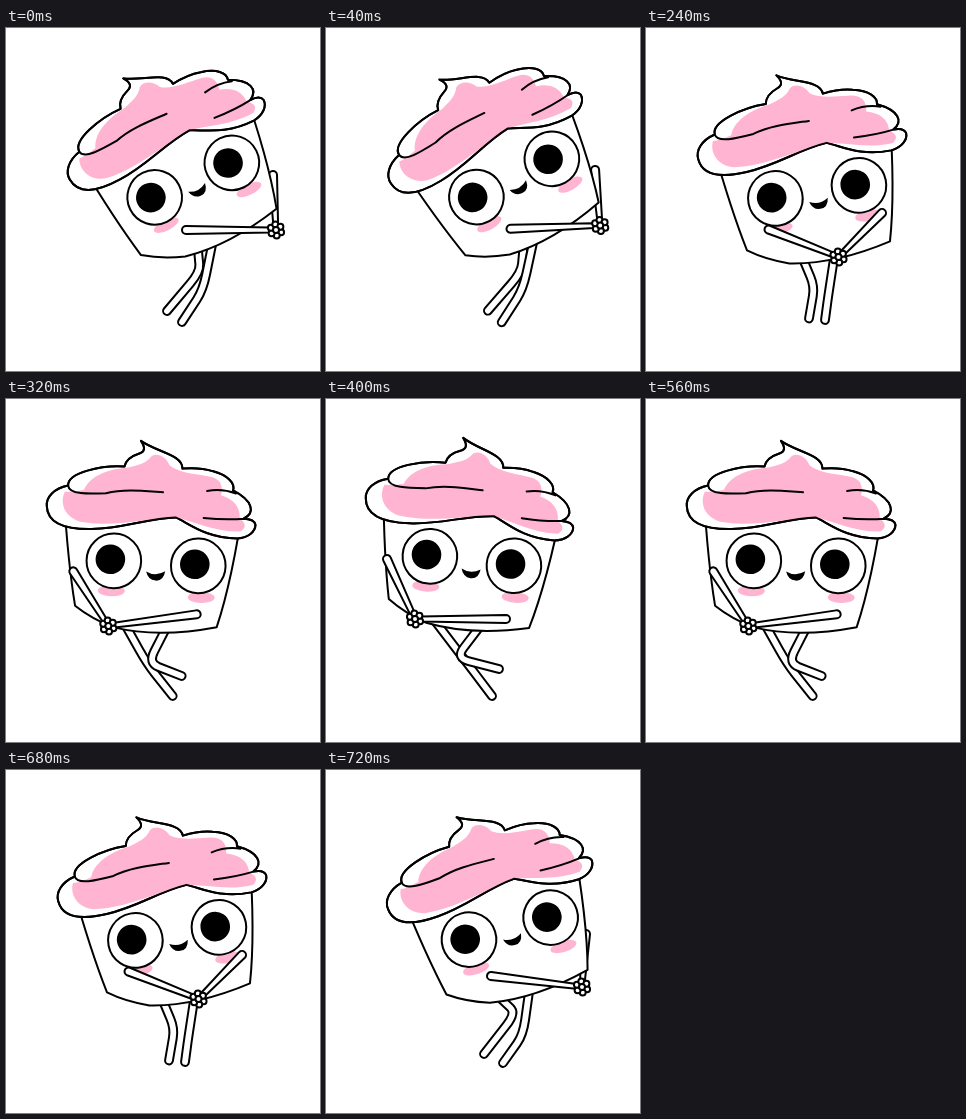
Animation of 314x343 px, one loop 0.76 s. Source, as an HTML page:

```html
<!DOCTYPE html>
<html lang="en">
<head>
<meta charset="utf-8">
<title>Dancing cupcake</title>
<style>
html, body { margin: 0; width: 100%; height: 100%; overflow: hidden; background: #fff; }
svg { display: block; width: 314px; height: 343px; }
.ink { fill: #fff; stroke: #000; stroke-width: 2; stroke-linejoin: round; stroke-linecap: round; }
.line { fill: none; }
.pink { fill: #ffb5d2; }
.leg { fill: none; stroke-linejoin: round; stroke-linecap: round; }
</style>
</head>
<body>
<svg id="stage" viewBox="0 0 314 343"></svg>
<script>
const LOOP = 760;
const PIVOT = [142.5, 110.5];

// Key poses from left to right; every other pose is a blend or an overshoot of two.
// at: body position, turn: degrees, arms: shoulders, legs: hip, knee, toe
const keys = [
  {
    at: [141, 106.8], turn: 4, arms: [[61, 160], [180, 220]], hand: [89, 220],
    legs: [[[109, 222], [138, 260], [166, 297]], [[152, 230], [130, 259], [173, 270]]]
  },
  {
    at: [144.8, 114.8], turn: -5, arms: [[80, 197], [212, 206]], hand: [129, 241],
    legs: [[[140, 234], [147, 274], [168, 297]], [[174, 232], [167, 274], [181, 291]]]
  },
  {
    at: [159, 109], turn: -17.5, arms: [[165, 206], [260, 164]], hand: [256, 217],
    legs: [[[174, 228], [190, 243], [158, 284]], [[203, 222], [197, 265], [177, 293]]]
  },
  {
    at: [155, 107], turn: -26.5, arms: [[180, 202], [267, 147]], hand: [270, 202],
    legs: [[[192, 222], [194, 244], [161, 283]], [[206, 217], [197, 262], [176, 294]]]
  }
];

// Start time and lean, counted in key poses
const steps = [
  [0, 3], [40, 3.3], [200, 2], [240, 1.5], [280, 1], [320, 1 / 3],
  [400, 0], [560, 1 / 3], [640, 1], [680, 1.5], [720, 2]
];

function mix(a, b, k) {
  if (typeof a === "number") return a + (b - a) * k;
  if (Array.isArray(a)) return a.map((v, i) => mix(v, b[i], k));
  return Object.fromEntries(Object.keys(a).map(key => [key, mix(a[key], b[key], k)]));
}

function poseAt(lean) {
  const i = Math.min(Math.floor(lean), keys.length - 2);
  return mix(keys[i], keys[i + 1], lean - i);
}

const path = (d, cls = "") => `<path class="${cls}" d="${d}"/>`;
const circle = (x, y, r, cls = "") => `<circle class="${cls}" cx="${x}" cy="${y}" r="${r}"/>`;
const cheek = (x, y) => `<ellipse class="pink" cx="${x}" cy="${y}" rx="13.5" ry="5.5"/>`;
const eye = (x, y) => circle(x, y, 27.3, "ink") + circle(x - 3.5, y - 1.5, 14.8);

const cup = path("M58 100 Q63 165 71 209 Q88 222 110 230 Q155 240 213 228 Q228 180 238 100 Z", "ink");

const face = cheek(107, 193.5) + cheek(197, 198.5) + eye(109, 163.5) + eye(193.5, 167) +
  path("M141.5 173.5 Q151 179 160.5 173 Q159 183 151 182.5 Q143.5 182 141.5 173.5 Z");

const creamEdge =
  "M62 89 C48 92 40 101 41 110 C42 126 58 133 86 132 C118 131 142 120 170 119 " +
  "C184 125 200 139 232 139 C243 138 250 132 250 125 C249 120 244 119 238 119 " +
  "C250 113 247 101 227 91 C229 84 222 76 206 72 C196 69 186 69 176 70 " +
  "C176 56 150 54 134 43 C139 50 138 54 132 56 C123 59 119 64 118 69 " +
  "C95 68 61 76 62 89 Z";

const icing =
  "M59 95 C54 104 57 120 75 125 C105 130 140 121 170 119 C190 123 210 133 235 132 " +
  "Q244 126 234 119 Q235 102 215 96 C218 84 212 78 200 77 C186 75 172 74 163 67 " +
  "C160 59 151 54 145 58 C139 66 132 67 122 70 C100 72 83 80 78 93 Q66 96 59 95 Z";

const swirls =
  "M62 89 C63 98 82 97 100 96 C118 91 138 93 157 94 " +
  "M201 92 Q216 89 230 94 M198 119 Q220 121 239 119";

const cream = path(creamEdge, "ink") + path(icing, "pink") + path(creamEdge + swirls, "ink line");

function arm([x, y], [hx, hy]) {
  const len = Math.hypot(hx - x, hy - y);
  const dx = (hx - x) / len, dy = (hy - y) / len;
  const ex = hx - dx * 6, ey = hy - dy * 6;
  const side = (px, py, r) => `${px - dy * r} ${py + dx * r}`;
  return path(`M${side(x, y, 4)} L${side(ex, ey, 2.4)} L${side(ex, ey, -2.4)} ` +
    `L${side(x, y, -4)} A4 4 0 0 0 ${side(x, y, 4)} Z`, "ink");
}

function leg([hip, knee, toe]) {
  const d = `M${hip} L${mix(hip, knee, .65)} Q${knee} ${mix(knee, toe, .3)} L${toe}`;
  const stroke = (color, width) => `<path class="leg" stroke="${color}" stroke-width="${width}" d="${d}"/>`;
  return stroke("#000", 9.8) + stroke("#fff", 5.8);
}

function hands([x, y]) {
  let out = "";
  for (let i = 0; i < 6; i++) {
    const a = i * Math.PI / 3 + .4;
    out += circle(x + 5.5 * Math.cos(a), y + 5.5 * Math.sin(a), 3, "ink");
  }
  return out + circle(x, y, 3, "ink");
}

function draw(lean) {
  const { at, turn, arms, hand, legs } = poseAt(lean);
  const [near, far] = arms.map(shoulder => arm(shoulder, hand));
  const body = `<g transform="translate(${at}) rotate(${turn}) translate(${-PIVOT[0]} ${-PIVOT[1]})">` +
    cup + face + cream + "</g>";
  // Leaning right turns the far arm behind the cup
  const torso = lean >= 2 ? far + body : body + far;
  return legs.map(leg).join("") + torso + near + hands(hand);
}

const stage = document.getElementById("stage");
const start = performance.now();
let shown = null;

function tick() {
  const t = (performance.now() - start) % LOOP;
  const lean = steps.findLast(([from]) => from <= t)[1];
  if (lean !== shown) {
    stage.innerHTML = draw(lean);
    shown = lean;
  }
  requestAnimationFrame(tick);
}
tick();
</script>
</body>
</html>
```
